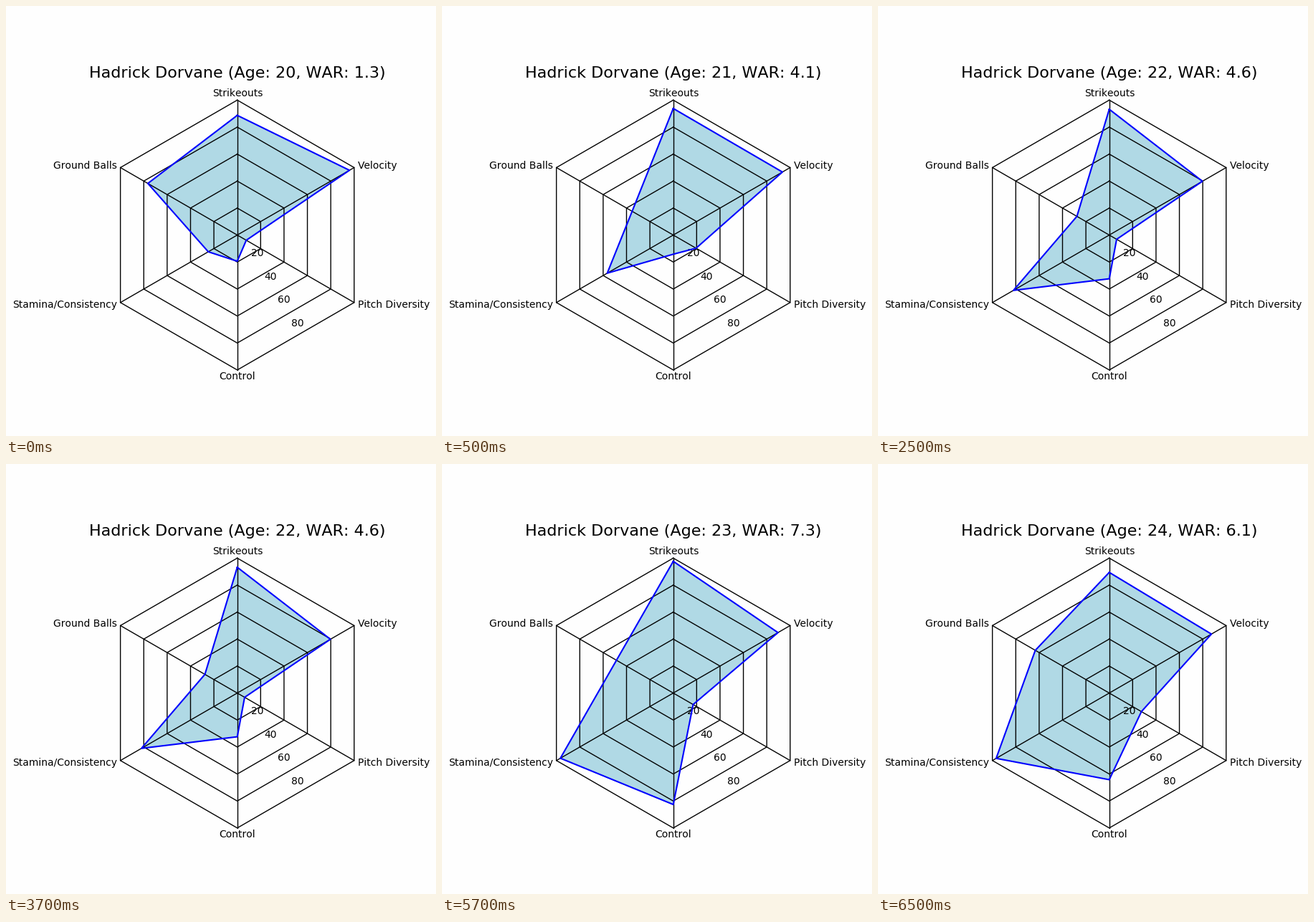
These frames come from a looping animation (600 px wide and 600 px high, 8000 ms). A matplotlib script:

```python
import matplotlib.pyplot as plt
import numpy as np
from matplotlib.animation import FuncAnimation

plt.rcParams["font.family"] = "DejaVu Sans"
plt.rcParams["text.kerning_factor"] = 6  # whole-pixel letter spacing

SIZE, DPI = 600, 100
CENTER = np.array([322.7, 319.6])
RADIUS = 188.3
STEP_MS = 500
FRAMES = 16

PLAYER = "Hadrick Dorvane"
FIRST_AGE = 20
SKILLS = ["Strikeouts", "Velocity", "Pitch Diversity",
          "Control", "Stamina/Consistency", "Ground Balls"]

# WAR of each season, then its percentile in each skill
SEASONS = [
    (1.3, [88.7, 96.0, 7.7, 19.4, 24.8, 76.5]),
    (4.1, [93.8, 93.4, 19.5, 14.2, 56.5, 35.2]),
    (4.6, [93.2, 79.7, 6.3, 32.4, 82.0, 27.7]),
    (7.3, [97.6, 89.6, 17.0, 82.6, 96.6, 48.6]),
    (6.1, [89.4, 87.4, 27.5, 64.2, 96.8, 63.3]),
]

# Unit vectors, clockwise from the top
ANGLES = np.arange(6) * np.pi / 3
SPOKES = np.column_stack([np.sin(ANGLES), -np.cos(ANGLES)])


def radar_points(values):
    """Closed outline in stage pixels; values run from 0 to 100."""
    reach = np.broadcast_to(values, 6) * RADIUS / 100
    points = CENTER + SPOKES * reach[:, None]
    return np.vstack([points, points[:1]])


def draw_grid(ax):
    style = dict(color="black", lw=1, zorder=1.5)
    for level in range(20, 101, 20):
        ax.plot(*radar_points(level).T, **style)
    for tip in radar_points(100)[:-1]:
        ax.plot(*np.array([CENTER, tip]).T, **style)


def draw_labels(ax):
    slope = np.array([0.5, np.sqrt(3) / 2])
    for level in range(20, 100, 20):
        ax.text(*(CENTER + slope * RADIUS * level / 100), str(level),
                fontsize=10, ha="left", va="bottom", zorder=1.6)

    # Labels beside the chart sit closer than those above and below
    for skill, spoke in zip(SKILLS, SPOKES):
        side = int(np.sign(np.round(spoke[0], 6)))
        reach = RADIUS + 9.2 - 4.4 * abs(spoke[0])
        x, y = CENTER + (0.2, 4.2) + spoke * reach
        ax.text(x, y, skill, fontsize=10, va="baseline",
                ha={-1: "right", 0: "center", 1: "left"}[side])


fig = plt.figure(figsize=(SIZE / DPI, SIZE / DPI), dpi=DPI,
                 facecolor="#fefefe")
ax = fig.add_axes([0, 0, 1, 1])
ax.set_xlim(0, SIZE)
ax.set_ylim(SIZE, 0)
ax.axis("off")
draw_grid(ax)
draw_labels(ax)

title = ax.text(CENTER[0], 100, "", fontsize=16, ha="center", va="baseline")
area, = ax.fill([0, 0, 0], [0, 0, 0], facecolor="#b0d9e5", lw=0, zorder=1)
outline, = ax.plot([], [], color="blue", lw=1.5, zorder=2)


def update(frame):
    # The first season shows for one step, later ones for four
    season = (frame + 3) // 4
    war, values = SEASONS[season]
    points = radar_points(values)
    area.set_xy(points)
    outline.set_data(*points.T)
    title.set_text(f"{PLAYER} (Age: {FIRST_AGE + season}, WAR: {war})")
    return area, outline, title


animation = FuncAnimation(fig, update, frames=FRAMES, interval=STEP_MS,
                          repeat=True, repeat_delay=0, blit=False)
plt.show()
```
